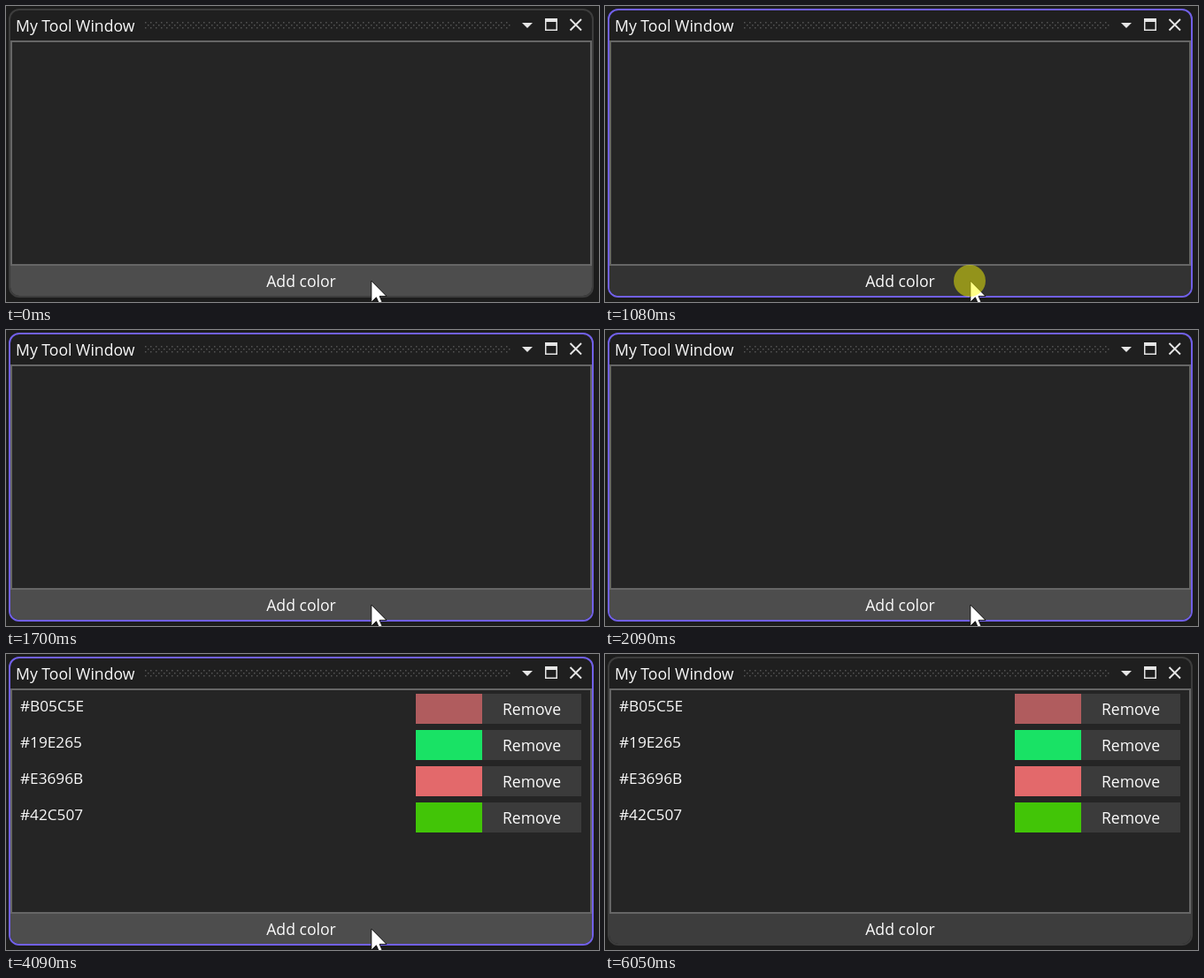
Animation, 670 px wide and 335 px high, one loop 6140 ms. Source, as an HTML page:

```html
<!DOCTYPE html>
<html lang="en">
<head>
<meta charset="utf-8">
<title>My Tool Window</title>
<style>
html, body { margin: 0; width: 100%; height: 100%; overflow: hidden; background: #1f1f1f; }
svg { display: block; width: 670px; height: 335px; }
text { font: 17.6px "Open Sans", "Noto Sans", sans-serif; fill: #fafafa; }
.hex { font-size: 17.2px; }
.mid { text-anchor: middle; }
</style>
</head>
<body>
<svg viewBox="0 0 670 335">
  <defs>
    <pattern id="grip" x="157" y="18" width="6" height="6" patternUnits="userSpaceOnUse">
      <path d="M0 0h1.5v1.5h-1.5zM3 3h1.5v1.5h-1.5z" fill="#545454"/>
    </pattern>
  </defs>
  <rect width="670" height="335" fill="#1c1c1c"/>
  <rect id="frame" x="4" y="4" width="659" height="325" rx="11" fill="#1f1f1f" stroke-width="2"/>
  <text x="11" y="28.5">My Tool Window</text>
  <rect x="157" y="18" width="413" height="8" fill="url(#grip)"/>
  <path d="M583 19h12l-6 6z" fill="#e6e6e6"/>
  <path d="M609 14h14v14h-14zM610.5 18v8.5h11V18z" fill="#e6e6e6" fill-rule="evenodd"/>
  <path d="M637.5 15l12.5 12.5M650 15l-12.5 12.5" stroke="#e6e6e6" stroke-width="1.9"/>
  <rect x="6" y="40" width="655" height="253" fill="#252525" stroke="#666" stroke-width="2"/>
  <g id="rows"></g>
  <path id="button" d="M5 294H662V318a10 10 0 0 1-10 10H15a10 10 0 0 1-10-10z"/>
  <text class="mid" x="333.5" y="318">Add color</text>
  <path id="cursor" d="M0 0V24.2L5.6 18.8L9.2 27L12.8 25.5L9.3 17.4H17.2z"
        fill="#fff" stroke="#111" stroke-width="1" stroke-linejoin="round"/>
  <circle id="halo" cx="412" cy="311" r="18" fill="#ff0" fill-opacity=".47"/>
</svg>
<script>
const LOOP = 6140;
const HOVER = '#4d4d4d', DOWN = '#333333', IDLE = '#3d3d3d';
const GREY = '#3d3d3d', PURPLE = '#7160e8';
const get = id => document.getElementById(id);

// Each table is a list of [start time, value].
const border = [[0, GREY], [670, PURPLE], [6050, GREY]];
const fill = [[0, HOVER], [670, DOWN], [730, HOVER], [1080, DOWN], [1240, HOVER],
  [1540, DOWN], [1700, HOVER], [1930, DOWN], [2090, HOVER], [5310, IDLE]];
const halo = [[0, 0], [670, 1], [700, 0], [1080, 1], [1240, 0],
  [1540, 1], [1670, 0], [1930, 1], [2060, 0]];
const cursorY = [[0, 311], [5240, 314], [5280, 321], [5310, 331], [5350, 345]];
const colors = [[2810, '#B05C5E'], [3240, '#19E265'], [3700, '#E3696B'], [4090, '#42C507']];

const rows = colors.map(([start, hex], i) => {
  const row = document.createElementNS('http://www.w3.org/2000/svg', 'g');
  row.setAttribute('transform', `translate(0 ${45 + 41 * i})`);
  row.innerHTML = `<text class="hex" x="16" y="20">${hex}</text>
    <rect x="463" width="75" height="34" fill="${hex}"/>
    <rect x="538" width="112" height="34" fill="#3b3b3b"/>
    <text class="mid" x="594" y="24">Remove</text>`;
  get('rows').append(row);
  return { row, start };
});

const at = (table, t) => table.reduce((v, [start, next]) => t >= start ? next : v, table[0][1]);

function draw(t) {
  get('frame').setAttribute('stroke', at(border, t));
  get('button').setAttribute('fill', at(fill, t));
  get('halo').setAttribute('opacity', at(halo, t));
  get('cursor').setAttribute('transform', `translate(412.8 ${at(cursorY, t)})`);
  for (const { row, start } of rows) row.setAttribute('opacity', t >= start ? 1 : 0);
}

const begin = performance.now();
function tick() {
  draw((performance.now() - begin) % LOOP);
  requestAnimationFrame(tick);
}
tick();
</script>
</body>
</html>
```
